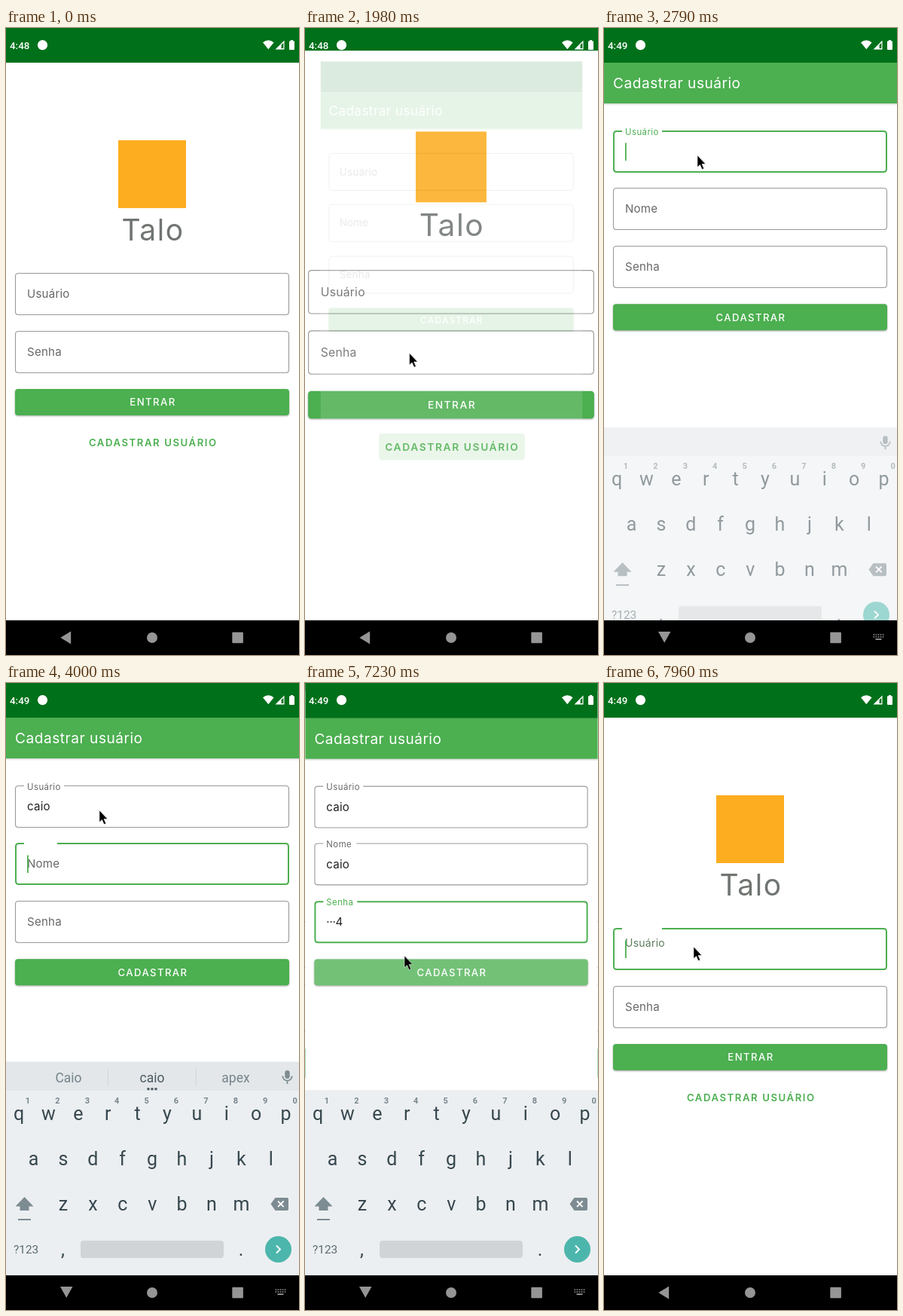
Write an HTML page that moves like this. It is 389 px wide and 832 px high and loops after 8000 ms.

```html
<!DOCTYPE html>
<html lang="pt">
<head>
<meta charset="utf-8">
<title>Cadastro</title>
<style>
html, body { margin: 0; width: 100%; height: 100%; overflow: hidden; background: #fff; }
svg { display: block; width: 389px; height: 832px; font-family: Inter, sans-serif; }
.kb { font-family: Roboto, sans-serif; }
.raised { filter: drop-shadow(0 1px 1.2px rgba(0, 0, 0, .35)); }
</style>
</head>
<body>
<svg id="stage" viewBox="0 0 389 832"></svg>
<script>
const LOOP = 8000, OPEN = 1920, CLOSE = 7210, CLOCK = 2300;
const GREEN = '#4caf50', DARK = '#00701a', KEY = '#37474f', ICON = '#7d8b92';
const USER = 'caio', APP = 'Talo', TEXT = 15.1, SPACING = 0.2;
const stage = document.getElementById('stage');
const pen = document.createElement('canvas').getContext('2d');
pen.font = `${TEXT}px Inter, sans-serif`;

const clamp = v => Math.min(1, Math.max(0, v));
const lerp = (a, b, p) => a + (b - a) * p;
const ramp = (t, start, length) => clamp((t - start) / length);

// Cubic Bezier easing through the given x and y control values.
function bezier(xs, ys) {
  const at = (c, u) => {
    const v = 1 - u;
    return v * v * v * c[0] + 3 * v * v * u * c[1] + 3 * v * u * u * c[2] + u * u * u * c[3];
  };
  return x => {
    let lo = 0, hi = 1;
    for (let i = 0; i < 24; i++) {
      const mid = (lo + hi) / 2;
      if (at(xs, mid) < x) lo = mid; else hi = mid;
    }
    return at(ys, hi);
  };
}
const standard = bezier([0, .4, .2, 1], [0, 0, 1, 1]);
const head = bezier([0, .05, .1333, .1667], [0, 0, .06, .4]);
const tail = bezier([.1667, .2083, .25, 1], [.4, .82, 1, 1]);
const windowEase = x => x <= 0 ? 0 : x >= 1 ? 1 : x < .1667 ? head(x) : tail(x);

// Markup helpers
const rect = (x, y, w, h, fill, more = '') =>
  `<rect x="${x}" y="${y}" width="${w}" height="${h}" fill="${fill}" ${more}/>`;
const path = (d, fill, more = '') => `<path d="${d}" fill="${fill}" ${more}/>`;
const circle = (x, y, r, fill) => `<circle cx="${x}" cy="${y}" r="${r}" fill="${fill}"/>`;
const text = (x, y, str, size, fill, more = '') =>
  `<text x="${x}" y="${y}" font-size="${size}" fill="${fill}" ${more}>${str}</text>`;
const mid = 'text-anchor="middle"';
const spaced = (n, more = '') => `letter-spacing="${n}" ${more}`;

function button(y, label, flash = 0) {
  return rect(12, y, 364, 35, GREEN, 'rx="4" class="raised"')
    + rect(12, y, 364, 35, '#fff', `rx="4" opacity="${flash}"`)
    + text(195, y + 22.3, label, 13.2, '#fff', spaced(1.4, `${mid} font-weight="500"`));
}

// Outlined text field; focus and blur are times, edit is the time of the last key.
function field(t, { label, y, notch, value = '', focus = Infinity, blur = Infinity, edit = focus, spacing = SPACING }) {
  const focused = t >= focus && t < blur;
  const up = standard(ramp(t, focus, 167));
  const gap = t >= focus ? 24 : notch;
  const tone = focused ? up : 0;
  const color = `rgb(${[[102, 76], [104, 175], [102, 80]].map(([a, b]) => Math.round(lerp(a, b, tone)))})`;
  // The thicker line grows inwards, so that the outer edge stays in place.
  const inset = focused ? .5 : 0, left = 12.5 + inset, right = 375.5 - inset, top = y + inset, bottom = y + 55 - inset;
  const outline = `M${notch} ${top}H${right - 4}q4 0 4 4V${bottom - 4}q0 4-4 4H${left + 4}q-4 0-4-4V${top + 4}q0-4 4-4H${gap}`;
  let out = path(outline, 'none', `stroke="${focused ? GREEN : '#999'}" stroke-width="${focused ? 2 : 1.1}"`);
  out += text(28, lerp(y + 32.7, y + 5, up), label, lerp(TEXT, 11.4, up), color, spaced(lerp(SPACING, .45, up)));
  if (value) out += text(28, y + 32.7, value, TEXT, '#212121', spaced(spacing));
  if (focused && (t - Math.max(edit, focus)) % 1000 < 500) {
    const width = pen.measureText(value).width + value.length * spacing;
    out += rect(28 + width, y + 16, 1.8, 23.5, GREEN);
  }
  return out;
}

// Typing schedules
const userKeys = [3200, 3340, 3610, 3670];
const nameKeys = [4400, 4530, 4660, 4790];
const passKeys = [5720, 5850, 6110, 6310];
const typed = (t, keys) => keys.filter(k => t >= k).length;
const lastKey = (t, keys) => keys[typed(t, keys) - 1];
const masked = n => n ? '·'.repeat(n - 1) + n : '';

function login(t) {
  const press = ramp(t, 1700, 120) * (t < 2500 ? .13 : 0);
  return rect(0, 0, 389, 832, '#fff') + rect(0, 0, 389, 46, DARK)
    + rect(149, 149, 90, 90, '#fcad20')
    + text(195, 282, APP, 39, '#707571', spaced(1.5, mid))
    + field(t, { label: 'Usuário', y: 325.5, notch: 77, focus: 7915 })
    + field(t, { label: 'Senha', y: 402.5, notch: 69 })
    + button(479, 'ENTRAR')
    + rect(102, 533, 186, 34, GREEN, `rx="4" opacity="${press}"`)
    + text(195.3, 554.7, 'CADASTRAR USUÁRIO', 13.2, GREEN, spaced(1.55, `${mid} font-weight="600"`));
}

function register(t) {
  return rect(0, 0, 389, 832, '#fff') + rect(0, 0, 389, 46, DARK)
    + rect(0, 100, 389, 1, '#000', 'opacity=".16"') + rect(0, 101, 389, 1.5, '#000', 'opacity=".07"')
    + rect(0, 46, 389, 54, GREEN)
    + text(12, 80, 'Cadastrar usuário', 19.1, '#fff', spaced(.52))
    + field(t, { label: 'Usuário', y: 136.5, notch: 77, focus: 2540, blur: 4000,
        value: USER.slice(0, typed(t, userKeys)), edit: lastKey(t, userKeys) })
    + field(t, { label: 'Nome', y: 212.5, notch: 68, focus: 3995, blur: 5060,
        value: USER.slice(0, typed(t, nameKeys)), edit: lastKey(t, nameKeys) })
    + field(t, { label: 'Senha', y: 289.5, notch: 69, focus: 5060, spacing: -.3,
        value: masked(typed(t, passKeys)), edit: lastKey(t, passKeys) })
    + button(366.3, 'CADASTRAR', .22 * ramp(t, 7080, 130));
}

function keyRow(keys, x, y) {
  return [...keys].map((k, i) => text(x + 39.4 * i, y, k, 25, KEY, mid)).join('');
}

const keyboard = rect(0, 541, 389, 300, '#eceff1')
  + keyRow('qwertyuiop', 17, 580) + keyRow('asdfghjkl', 36.5, 640) + keyRow('zxcvbnm', 76, 700)
  + [...'1234567890'].map((d, i) => text(29 + 39.4 * i, 558, d, 11, '#78868d', `${mid} font-weight="600"`)).join('')
  + path('M24.5 682L36.5 694.5H30.5V700H18.5V694.5H12.5Z', ICON) + rect(16, 711, 17, 2, ICON)
  + path('M351.5 691.3L357.5 683H373q2 0 2 2V698q0 2-2 2H357.5Z', ICON)
  + path('M361 687.5l7.6 7.6m0-7.6l-7.6 7.6', 'none', 'stroke="#fff" stroke-width="1.8"')
  + text(10, 757, '?123', 15.4, '#5c6b73') + text(75.5, 760, ',', 25, KEY, mid)
  + rect(99, 740, 190, 23, '#d1d4d6', 'rx="4"') + text(312, 760, '.', 25, KEY, mid)
  + circle(361.5, 751.5, 17.5, '#4db6ac')
  + path('M359 746.5l5 5-5 5', 'none', 'stroke="#fff" stroke-width="1.9"');

const guesses = [['C', 'c', 'e'], ['Ca', 'ca', 'cs'], ['Cai', 'cai', 'vai'], ['Caio', USER, 'apex']];

function suggestions(t) {
  const count = t < 4060 ? typed(t - 60, userKeys) : typed(t - 70, nameKeys);
  let out = rect(0, 503, 389, 38.5, '#e3e7e9')
    + rect(370.3, 514, 6.4, 11, ICON, 'rx="3.2"')
    + path('M367.3 521.5a6.2 6.2 0 0 0 12.4 0M373.5 528v4', 'none', `stroke="${ICON}" stroke-width="1.8"`);
  if (!count) return out;
  guesses[count - 1].forEach((word, i) => {
    out += text(83 + 111 * i, 529.7, word, 17.5, i === 1 ? '#4c5b63' : '#75848b', mid);
  });
  out += rect(135, 512, 1, 23, '#d0d5d8') + rect(252, 512, 1, 23, '#d0d5d8');
  return out + [189, 194, 199].map(x => circle(x, 538.7, 1.8, '#4c5b63')).join('');
}

function inputPanel(t) {
  const shown = 1 - (1 - ramp(t, 2740, 220)) ** 3 - ramp(t, 7290, 150);
  if (shown <= 0) return '';
  return `<g class="kb" opacity="${shown}" transform="translate(0 ${(1 - shown) * 60})">`
    + rect(0, t < 5120 ? 502 : 540, 389, 1, '#000', 'opacity=".05"')
    + (t < 5120 ? suggestions(t) : '') + keyboard + '</g>';
}

function systemBars(t) {
  const grey = '#959595', typing = t >= 2740 && t < 7330;
  let out = text(5, 27.5, t < CLOCK ? '4:48' : '4:49', 13.4, '#fff', 'class="kb" font-weight="500"')
    + circle(48.5, 22.7, 6.6, '#fff')
    + path('M341 19.3q7.3-6 14.6 0L348.3 28.3Z', '#fff')
    + path('M357.5 28.5L369.5 16.5V28.5Z', '#fff') + path('M365.6 22.4l2.7-2.6V27h-2.7Z', DARK)
    + rect(376, 17.3, 7, 11.7, '#fff', 'rx="1"') + rect(378, 16, 3, 2, '#fff')
    + rect(0, 786, 389, 46, '#000')
    + path(typing ? 'M72 801H88.5L80.2 815.7Z' : 'M86.2 800.6V817.4L72.4 809Z', grey)
    + circle(194, 809, 7, grey) + rect(300.3, 801.8, 14.6, 14.4, grey, 'rx="1"');
  if (typing) {
    out += path('M357.5 805h14M357.5 808h14', 'none', `stroke="${grey}" stroke-width="1.7" stroke-dasharray="1.7 1.35"`)
      + rect(360.5, 810.2, 8, 1.8, grey);
  }
  return out;
}

// Pointer stops: time, x, y
const stops = [
  [250, 348, 793], [450, 263, 545], [600, 216, 478], [750, 181, 402], [900, 151, 470], [1050, 135, 540],
  [1110, 137, 546], [1180, 148.5, 551], [1250, 148.5, 551], [1380, 143, 540], [1900, 143, 540], [2160, 129, 191.5],
  [2240, 129, 191.5], [2380, 126, 175], [2520, 124, 169], [6510, 124, 169], [7000, 132, 362],
  [7370, 132, 362], [7840, 119, 350], [LOOP, 119, 350]
];

function pointer(t) {
  if (t < stops[0][0]) return '';
  const i = stops.findIndex(s => s[0] > t);
  const [a, b] = [stops[i - 1], stops[i]];
  const p = ramp(t, a[0], b[0] - a[0]);
  return path('M0 0V15.6L3.5 12.5 6.2 18.6 8.7 17.5 6 11.5H10.8Z', '#000',
    `stroke="#fff" stroke-width=".5" transform="translate(${lerp(a[1], b[1], p)} ${lerp(a[2], b[2], p)})"`);
}

const layer = (content, scale, alpha = 1) =>
  `<g transform="translate(194.5 416) scale(${scale}) translate(-194.5 -416)" opacity="${alpha}">${content}</g>`;

function screens(t) {
  const opening = windowEase(ramp(t, OPEN, 400)), closing = windowEase(ramp(t, CLOSE, 400));
  const alpha = t < CLOSE ? ramp(t, OPEN + 50, 83) : 1 - ramp(t, CLOSE + 35, 83);
  const back = t < CLOSE ? lerp(1, 1.15, opening) : lerp(1.1, 1, closing);
  const front = t < CLOSE ? lerp(.85, 1, opening) : lerp(1, .9, closing);
  return layer(login(t), back) + (alpha > 0 ? layer(register(t), front, alpha) : '');
}

function draw() {
  const t = performance.now() % LOOP;
  stage.innerHTML = screens(t) + inputPanel(t) + systemBars(t) + pointer(t);
  requestAnimationFrame(draw);
}
draw();
</script>
</body>
</html>
```
